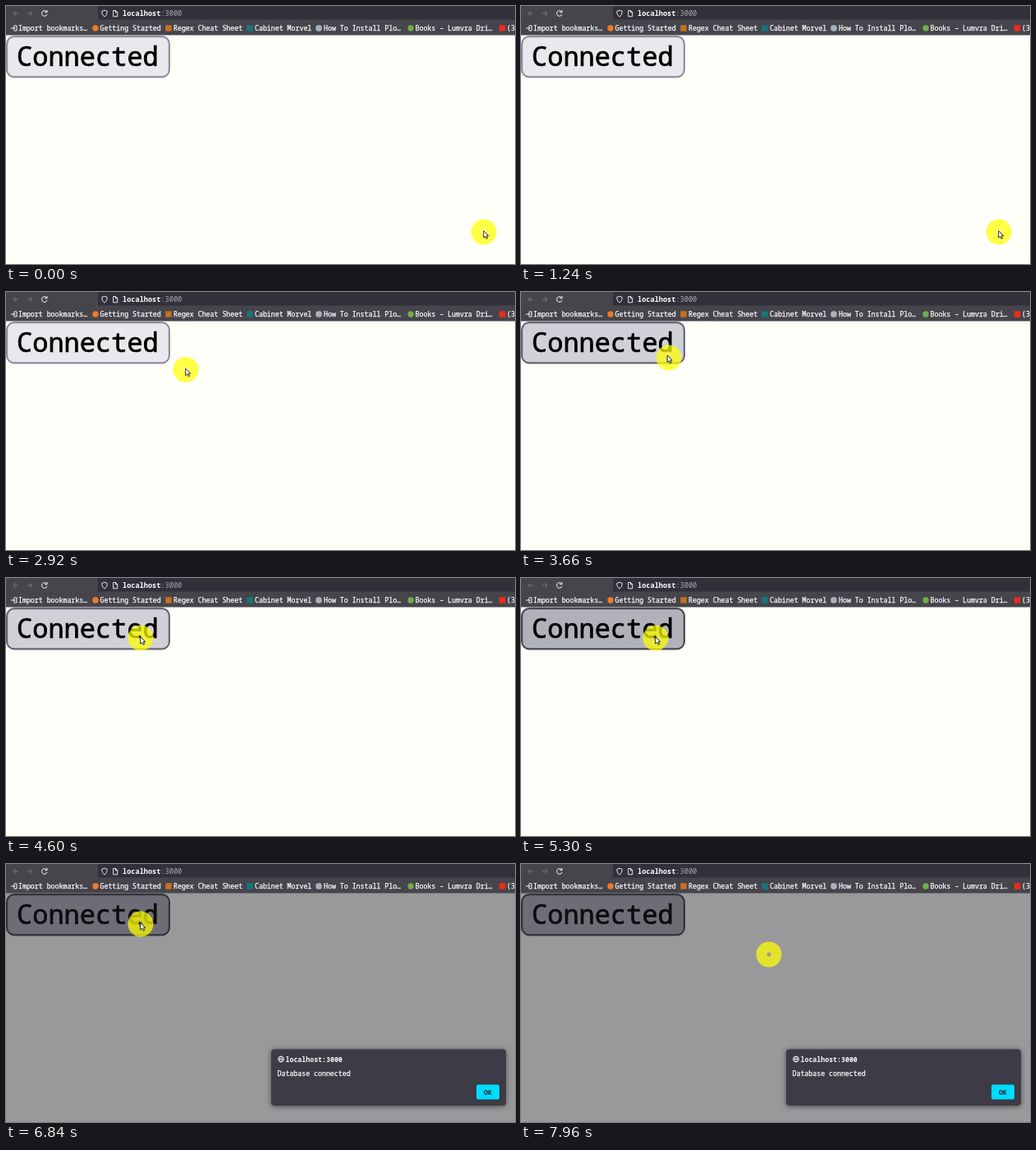
An HTML page that plays this animation: 620 px wide and 314 px high, repeating every 8 s.

```html
<!DOCTYPE html>
<html lang="en">
<head>
<meta charset="utf-8">
<title>Connected</title>
<style>
  html, body { margin: 0; width: 620px; height: 314px; overflow: hidden; }
  svg { display: block; font: 500 8.25px "Noto Sans Mono", "DejaVu Sans Mono", monospace; }
  text { white-space: pre; }
  .line { fill: none; stroke: #fbfbfe; }
  .dim { stroke: #77767c; }
  .label { fill: #fbfbfe; stroke: #fbfbfe; stroke-width: .25; }
  #page { fill: #fffffa; }
  #button rect { fill: #e9e9ed; stroke: #8f8f9d; stroke-width: 2.2; }
  #button text { font-size: 32px; fill: #000; stroke: #000; stroke-width: .7; }
  .hover #button rect { fill: #d0d0d7; stroke: #676774; }
  .active #button rect { fill: #b1b1b9; stroke: #484851; }
  .modal #page { fill: #99999c; }
  .modal #button rect { fill: #6e6d75; stroke: #34333c; }
  .modal #button text { fill: #0d0c0f; stroke: #0d0c0f; }
  #dialog { visibility: hidden; }
  .modal #dialog { visibility: visible; }
  #dialog > rect:first-child { filter: drop-shadow(0 1px 3px #0008); }
</style>
</head>
<body>
<svg id="stage" width="620" height="314" viewBox="0 0 620 314">
  <rect id="page" width="620" height="314"/>

  <g id="toolbar">
    <rect width="620" height="35.5" fill="#46454c"/>
    <rect x="112" width="508" height="16.5" fill="#32313a"/>
    <path class="line dim" d="M15 9H9m3-3-3 3 3 3M26 9h6m-3-3 3 3-3 3"/>
    <path class="line" d="M49.5 7a3.3 3.3 0 1 0 .5 3M50 5v2.7h-2.7"/>
    <path class="line" stroke-width=".9" d="M120 5.2l3.2 1.2c0 3-.8 5-3.2 6.6c-2.4-1.6-3.2-3.6-3.2-6.6zM130.7 5.5h3l2 2v5.3h-5zM133.5 5.5v2.3h2.2"/>
    <text x="142" y="11.6" font-size="8.6" fill="#a9a9ae"><tspan fill="#fff" font-weight="600">localhost</tspan>:3000</text>
    <path class="line" d="M9.5 24H13v6H9.5M6 27h5m-2-2 2 2-2 2"/>
    <g id="bookmarks"></g>
  </g>

  <g id="button">
    <rect x="1.1" y="37.1" width="197.8" height="49.3" rx="9"/>
    <text x="13" y="73">Connected</text>
  </g>

  <g id="dialog">
    <rect x="323" y="225.5" width="286" height="68.5" rx="4" fill="#3c3b46"/>
    <g class="line" stroke-width=".8">
      <circle cx="335" cy="237.5" r="3.5"/>
      <ellipse cx="335" cy="237.5" rx="1.5" ry="3.5"/>
      <path d="M331.5 237.5h7"/>
    </g>
    <text x="340.5" y="240.6" font-weight="600" fill="#fbfbfe">localhost:3000</text>
    <text class="label" x="330.5" y="258.4">Database connected</text>
    <rect x="573" y="268.5" width="28" height="18" rx="2" fill="#00ddff"/>
    <text x="582" y="280.6" font-weight="600" fill="#2b2a33">OK</text>
  </g>

  <circle id="halo" r="9" fill="none" stroke="#ff0" stroke-opacity=".72" stroke-width="13"/>
  <path id="arrow" d="M0 0V8.5L2 6.8L3.5 9.8L5 9.1L3.6 6.2H6Z" fill="#fff" stroke="#111" stroke-width=".9"/>
</svg>
<script>
const LOOP = 8000, LEAD = 100;
const $ = id => document.getElementById(id);

// label x, label, icon x, icon colour, icon corner radius
const bookmarks = [
  [15, "Import bookmarks…"],
  [114.5, "Getting Started", 109, "#f07a28", 4],
  [204, "Regex Cheat Sheet", 198, "#c8701c", 0],
  [303, "Cabinet Morvel", 297, "#16777a", 0],
  [387, "How To Install Plo…", 381, "#a9b0c0", 3],
  [498.5, "Books – Lumvra Dri…", 493, "#6fae4a", 4],
  [610, "(3", 604.5, "#ee2a1c", 0]
];
$("bookmarks").innerHTML = bookmarks.map(([x, label, ix, colour, r]) =>
  (ix ? `<rect x="${ix - 3.7}" y="23.3" width="7.4" height="7.4" rx="${r}" fill="${colour}"/>` : "") +
  `<text class="label" x="${x}" y="30">${label}</text>`).join("");

const START = 120, PERIOD = 1120;
const beats = [0, 40, 180, 320, 460, 560, 700, 740, 880, 1000];
function refreshTime(t) {
  if (t < START) return 0;
  const phase = (t - START) % PERIOD;
  return t - phase + beats.findLast(b => b <= phase);
}

// pointer path: time, x, y
const path = [
  [0, 582, 275], [1400, 582, 275], [1560, 555, 267], [1800, 405, 219],
  [1980, 320, 191], [2080, 298.5, 170], [2240, 291, 157], [2360, 285, 152],
  [2680, 229, 103], [2820, 219, 94.5], [3060, 219, 94.5], [3360, 197, 85],
  [3660, 180, 80], [3760, 178.5, 78.5], [4100, 164, 73], [7400, 164, 73],
  [7700, 170, 71], [7840, 190, 74.5], [7960, 302, 110], [8000, 328, 124]
];
function pointer(t) {
  t = Math.min(t, LOOP);
  const i = Math.max(path.findIndex(p => p[0] >= t), 1);
  const [t0, x0, y0] = path[i - 1], [t1, x1, y1] = path[i];
  const k = (t - t0) / (t1 - t0);
  return [x0 + (x1 - x0) * k, y0 + (y1 - y0) * k];
}

function draw(now) {
  const t = refreshTime(now % LOOP);
  $("stage").setAttribute("class",
    t >= 5340 ? "modal" : t >= 5300 ? "active" : t >= 3240 ? "hover" : "");
  $("halo").setAttribute("transform", `translate(${pointer(t)})`);
  // the arrow runs slightly ahead of the halo
  const [x, y] = pointer(t + LEAD);
  $("arrow").setAttribute("transform", `translate(${x - 0.3} ${y - 1.5})`);
  $("arrow").setAttribute("visibility", t < 7840 ? "visible" : "hidden");
  requestAnimationFrame(draw);
}
draw(performance.now());
</script>
</body>
</html>
```
